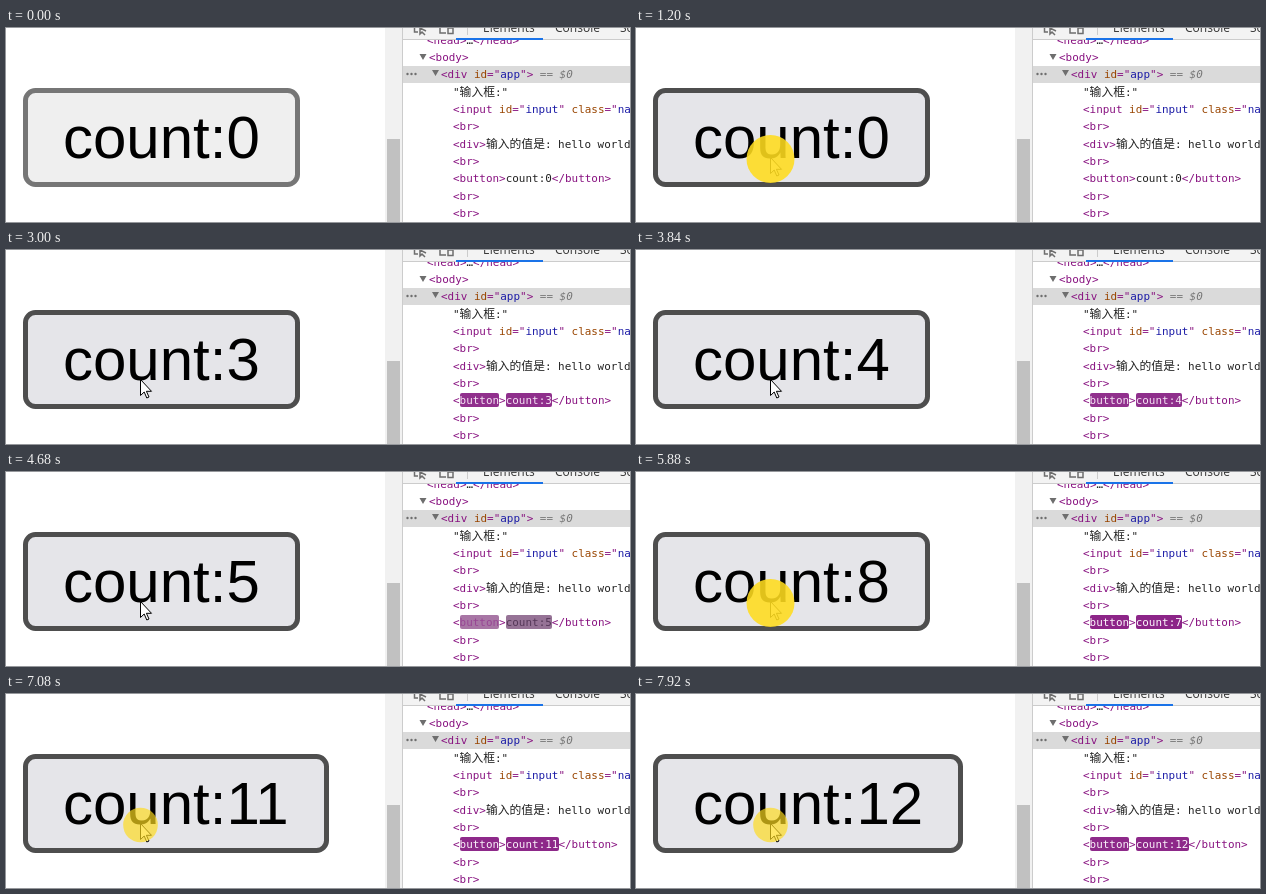
These frames come from a looping animation (624x194 px, 8 s). An HTML page:

```html
<!DOCTYPE html>
<html lang="zh">
<head>
<meta charset="utf-8">
<title>Button counter</title>
<style>
html, body { margin: 0; width: 100%; height: 100%; overflow: hidden; background: #fff; }
svg { display: block; width: 624px; height: 194px; }
text { white-space: pre; }
.code { font: 10.95px "DejaVu Sans Mono", "Noto Sans CJK SC", "Noto Sans CJK", monospace; fill: #222; }
.cjk { font: 11.8px "Noto Sans CJK SC", "Noto Sans CJK", sans-serif; }
.tag { fill: #881280; }
.attr { fill: #994500; }
.val { fill: #1a1aa6; }
.ref { fill: #777; font-style: italic; }
.tab { font: 12px "Open Sans", "Noto Sans", sans-serif; fill: #333; }
#label { font: 60px "Liberation Sans", Arial, sans-serif; }
</style>
</head>
<body>
<svg viewBox="0 0 624 194">
  <rect id="btn" x="19.5" y="62.5" width="272" height="94" rx="10" stroke-width="5"/>
  <text id="label" x="57" y="129.5">count:0</text>

  <g id="pointer">
    <path d="M.5 .5V16.5L4.2 13L6.8 19L9 18L6.4 12.3H11.5Z" fill="#fff" stroke="#000"/>
  </g>
  <circle id="ring" cx="134.5" cy="131" fill="#ffdc1e"/>

  <rect x="379" width="17" height="194" fill="#f1f1f1"/>
  <rect x="381" y="111" width="13" height="83" fill="#c1c1c1"/>
  <rect x="396" width="228" height="194" fill="#fff"/>
  <rect x="396" width="1" height="194" fill="#ccc"/>
  <rect x="397" y="38" width="227" height="17" fill="#dadada"/>
  <g id="tree"></g>
  <rect id="markTag" x="454" y="143" width="39" height="14" rx="2"/>
  <rect id="markText" x="500" y="143" width="46" height="14" rx="2"/>
  <text class="code" x="447" y="154"><tspan class="tag">&lt;</tspan><tspan id="tag">button</tspan><tspan class="tag">&gt;</tspan><tspan id="value">count:0</tspan><tspan class="tag">&lt;/button&gt;</tspan></text>
  <g fill="#6e6e6e">
    <path d="M413.5 26h7l-3.5 6zM426 42h7l-3.5 6z"/>
    <circle cx="401.5" cy="46" r="1.2"/><circle cx="405.5" cy="46" r="1.2"/><circle cx="409.5" cy="46" r="1.2"/>
  </g>

  <rect x="397" width="227" height="11" fill="#f3f3f3"/>
  <rect x="397" y="11" width="227" height="1" fill="#ccc"/>
  <rect x="450" y="10" width="87" height="2" fill="#1a73e8"/>
  <rect x="461" width="1" height="7" fill="#ccc"/>
  <g fill="none" stroke="#6e6e6e" stroke-width="1.5">
    <path d="M408.5 0V4H412M414 0V6L416 4L419 7M414 0L420 3"/>
    <path d="M434 0V5H440M442 0H447V5.5H442Z"/>
  </g>
  <text class="tab" x="477" y="3.5">Elements</text>
  <text class="tab" x="549" y="3.5">Console</text>
  <text class="tab" x="614" y="3.5">Sources</text>
</svg>
<script>
const $ = id => document.getElementById(id);
const LOOP = 8000, STEP = 120;

// Each row: x, baseline, then [class, text] runs
const rows = [
  [421, 15.5, ['tag', '<head>'], ['', '…'], ['tag', '</head>']],
  [423, 33, ['tag', '<body>']],
  [435, 50, ['tag', '<div '], ['attr', 'id'], ['tag', '="'], ['val', 'app'], ['tag', '">'], ['ref', ' == $0']],
  [447, 68, ['', '"'], ['cjk', '输入框'], ['', ':"']],
  [447, 85, ['tag', '<input '], ['attr', 'id'], ['tag', '="'], ['val', 'input'], ['tag', '" '],
    ['attr', 'class'], ['tag', '="'], ['val', 'name'], ['tag', '">']],
  [447, 102, ['tag', '<br>']],
  [447, 120, ['tag', '<div>'], ['cjk', '输入的值是'], ['', ': hello world'], ['tag', '</div>']],
  [447, 137, ['tag', '<br>']],
  [447, 172, ['tag', '<br>']],
  [447, 189, ['tag', '<br>']]
];

function add(parent, name, attrs, text = '') {
  const el = document.createElementNS('http://www.w3.org/2000/svg', name);
  for (const k in attrs) el.setAttribute(k, attrs[k]);
  el.textContent = text;
  return parent.appendChild(el);
}
for (const [x, y, ...runs] of rows) {
  const line = add($('tree'), 'text', { class: 'code', x, y });
  for (const [cls, text] of runs) add(line, 'tspan', { class: cls }, text);
}

// Press times; the label follows after 120 ms, the tree after 240 ms
const presses = [1200, 2040, 2520, 3360, 3960, 5400, 5580, 5760, 6120, 6420, 6720, 7560];
const countAt = t => presses.filter(p => p <= t).length;

// Highlight fade: age, then rgba
const purple = [139, 33, 134, 1], white = [255, 255, 255, 1];
const fades = {
  markTag: [[0, purple], [240, [145, 48, 141, 1]], [480, [168, 118, 165, 1]], [1100, [245, 219, 244, 0]]],
  markText: [[0, purple], [240, [143, 47, 140, 1]], [480, [150, 115, 150, 1]], [1100, [245, 219, 244, 0]]],
  tag: [[0, white], [240, [245, 228, 244, 1]], [480, [152, 70, 148, 1]], [1100, [136, 18, 128, 1]]],
  value: [[0, white], [240, [245, 228, 244, 1]], [480, [85, 55, 88, 1]], [1100, [34, 34, 34, 1]]]
};

function colorAt(keys, age) {
  let i = 1;
  while (i < keys.length - 1 && age > keys[i][0]) i++;
  const [t0, a] = keys[i - 1], [t1, b] = keys[i];
  const k = Math.min(1, Math.max(0, (age - t0) / (t1 - t0)));
  return `rgba(${a.map((v, j) => v + (b[j] - v) * k).join(',')})`;
}

function drawButton(t) {
  const n = countAt(t - 120), hover = t >= 600;
  $('label').textContent = 'count:' + n;
  $('btn').setAttribute('width', n < 10 ? 272 : n === 11 ? 301 : 305);
  $('btn').style.fill = hover ? '#e5e5e9' : '#efefef';
  $('btn').style.stroke = hover ? '#4e4e4e' : '#767676';
}

function drawPointer(t) {
  $('pointer').style.display = t < 600 ? 'none' : '';
  $('pointer').setAttribute('transform', t < 720 ? 'translate(143 140)' : 'translate(134 129)');
  const age = t - (presses[countAt(t) - 1] ?? -LOOP);
  const k = Math.min(1, Math.max(0, (age - 120) / 360));
  $('ring').setAttribute('r', 24 - 10 * k);
  $('ring').style.opacity = k < 1 ? 0.88 - 0.3 * k : 0;
}

function drawTree(t) {
  const n = countAt(t - 240);
  const age = n ? t - 240 - presses[n - 1] : LOOP;
  $('value').textContent = 'count:' + n;
  $('markText').setAttribute('width', n < 10 ? 46 : 53);
  for (const id in fades) $(id).style.fill = colorAt(fades[id], age);
}

function draw(now) {
  const t = Math.floor((now % LOOP) / STEP) * STEP;
  drawButton(t);
  drawPointer(t);
  drawTree(t);
}

const start = performance.now();
function tick(now) {
  draw(Math.max(0, now - start));
  requestAnimationFrame(tick);
}
draw(0);
requestAnimationFrame(tick);
</script>
</body>
</html>
```
